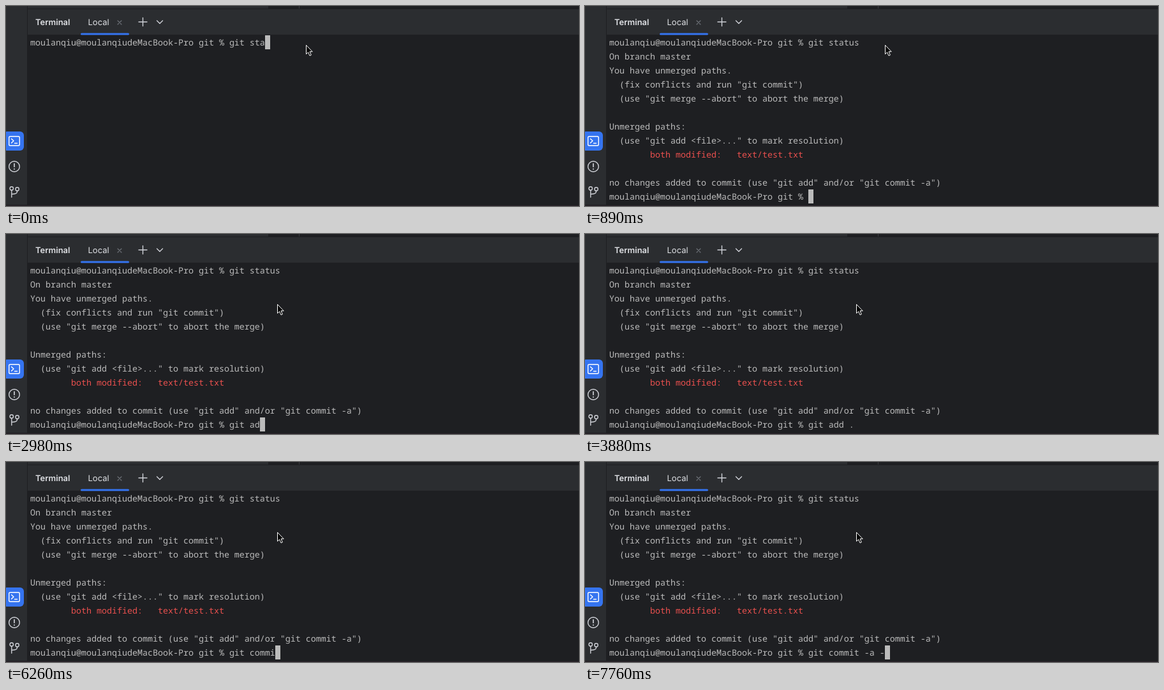
These frames come from a looping animation (898x314 px, 8 s). An HTML page:

```html
<!DOCTYPE html>
<html lang="en">
<head>
<meta charset="utf-8">
<title>Terminal</title>
<style>
  html, body { margin: 0; width: 100%; height: 100%; overflow: hidden; background: #1e1f22; }
  svg { display: block; }
  text { white-space: pre; text-rendering: geometricPrecision; }
  .ui { font: 13px Inter, sans-serif; fill: #dfe1e5; }
  .term { font: 13.333px "Noto Sans Mono", monospace; fill: #bbbbbb; font-variant-ligatures: none; }
  .term .red { fill: #e9504e; }
  .icon { fill: none; stroke: #ced0d6; stroke-width: 1.4; stroke-linecap: round; stroke-linejoin: round; }
</style>
</head>
<body>
<svg width="898" height="314" viewBox="0 0 898 314">
  <rect width="898" height="314" fill="#1e1f22"/>
  <!-- panels -->
  <g fill="#2b2d30">
    <rect width="33" height="312"/>
    <rect x="34" width="377" height="4"/>
    <rect x="34" y="5" width="864" height="40"/>
    <rect x="459" width="1" height="4" fill="#393b40"/>
    <rect y="313" width="898" height="1" fill="#2a222a"/>
  </g>
  <!-- tab bar -->
  <text class="ui" x="46" y="30" font-weight="600" style="font-weight:600">Terminal</text>
  <text class="ui" x="128.5" y="30">Local</text>
  <rect x="117" y="42.5" width="76" height="3" rx="1.5" fill="#3574f0"/>
  <g class="icon">
    <path d="M175 23l6 6m0-6l-6 6" stroke="#6f737a" stroke-width="1.1"/>
    <path d="M208 25h13m-6.5-6.5v13"/>
    <path d="M236.5 23l4.5 4.5 4.5-4.5"/>
  </g>
  <!-- side bar -->
  <rect x="-4" y="197" width="32" height="30" rx="6" fill="#3574f0"/>
  <g class="icon">
    <g stroke="#fff">
      <rect x="4.7" y="204.7" width="16.6" height="14.6" rx="2"/>
      <path d="M8.5 208.5l3.5 3.3-3.5 3.3M13.5 215.5h4"/>
    </g>
    <circle cx="13" cy="252" r="8.3"/>
    <path d="M13 247.5v5" stroke-width="1.7"/>
    <circle cx="13" cy="256" r="1" fill="#ced0d6" stroke="none"/>
    <circle cx="8.8" cy="286.5" r="2.7"/>
    <circle cx="17.6" cy="287.5" r="2.7"/>
    <path d="M8.8 289.2v11M17.6 290.2c0 4.6-3 5-8.8 5.3"/>
  </g>
  <g class="term" id="screen"></g>
  <rect id="caret" width="8" height="22" fill="#bbbbbb"/>
  <path id="mouse" d="M0.5 0.5V14.5L3.6 11.6 6 17 8.3 16 6 10.7H10.2Z" fill="#000" stroke="#fff" stroke-linejoin="round"/>
</svg>
<script>
const LOOP = 8000, LEFT = 38, TOP = 46, COL = 8, ROW = 22;
const PROMPT = 'moulanqiu@moulanqiudeMacBook-Pro git % ';
const OUTPUT = [
  'On branch master',
  'You have unmerged paths.',
  '  (fix conflicts and run "git commit")',
  '  (use "git merge --abort" to abort the merge)',
  '',
  'Unmerged paths:',
  '  (use "git add <file>..." to mark resolution)',
  '        both modified:   text/test.txt',
  '',
  'no changes added to commit (use "git add" and/or "git commit -a")'
];
const STATUS = 'git status', ADD = 'git add .', COMMIT = 'git commit -a -';

// [time, command, number of characters typed]
const KEYS = [
  [0, STATUS, 7], [150, STATUS, 8], [590, STATUS, 9], [740, STATUS, 10],
  [890, ADD, 0], [2240, ADD, 2], [2390, ADD, 3], [2530, ADD, 4], [2680, ADD, 5],
  [2980, ADD, 6], [3130, ADD, 7], [3280, ADD, 8], [3430, ADD, 9],
  [4630, ADD, 8], [4770, ADD, 7], [4920, ADD, 6], [5070, ADD, 4],
  [5370, COMMIT, 5], [5520, COMMIT, 6], [5970, COMMIT, 7], [6110, COMMIT, 8],
  [6260, COMMIT, 9], [6410, COMMIT, 11], [6860, COMMIT, 12], [7160, COMMIT, 13],
  [7460, COMMIT, 14], [7760, COMMIT, 15]
];
const MOUSE = [[0, 470, 61], [1790, 446, 88], [1940, 425, 110]];
const BLINKS = [[1340, 1940], [3880, 4480]];
const RUN_AT = 890;

const byId = id => document.getElementById(id);
const screen = byId('screen'), caret = byId('caret'), mouse = byId('mouse');
const latest = (steps, t) => steps.findLast(step => step[0] <= t);

const rows = [PROMPT, ...OUTPUT, PROMPT].map((line, i) => {
  const row = document.createElementNS('http://www.w3.org/2000/svg', 'text');
  row.setAttribute('x', LEFT);
  row.setAttribute('y', TOP + 16 + i * ROW);
  if (line.includes('both modified')) row.setAttribute('class', 'red');
  row.textContent = line;
  return screen.appendChild(row);
});

function draw(t) {
  const [, command, count] = latest(KEYS, t);
  const typed = PROMPT + command.slice(0, count);
  const done = t >= RUN_AT;
  const current = done ? rows.length - 1 : 0;

  rows.forEach((row, i) => row.setAttribute('visibility', i <= current ? 'visible' : 'hidden'));
  rows[0].textContent = done ? PROMPT + STATUS : typed;
  if (done) rows[current].textContent = typed;

  caret.setAttribute('x', LEFT + typed.length * COL);
  caret.setAttribute('y', TOP + current * ROW);
  const off = BLINKS.some(([from, to]) => t >= from && t < to);
  caret.setAttribute('visibility', off ? 'hidden' : 'visible');

  const [, x, y] = latest(MOUSE, t);
  mouse.setAttribute('transform', `translate(${x} ${y})`);
}

const start = performance.now();
function tick() {
  draw((performance.now() - start) % LOOP);
  requestAnimationFrame(tick);
}
tick();
</script>
</body>
</html>
```
